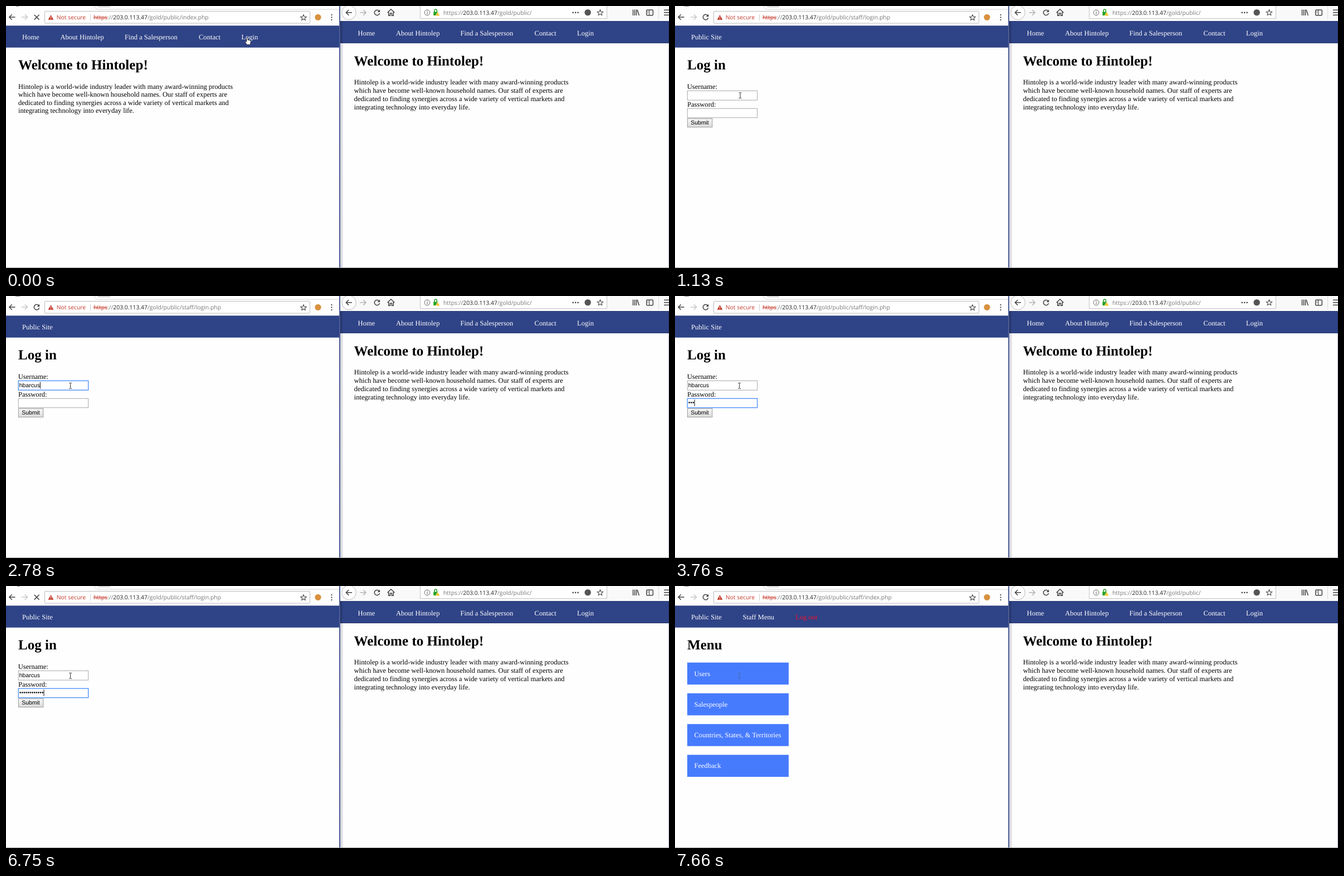
An HTML page that plays this animation: 1190 px wide and 471 px high, repeating every 8000 ms.

```html
<!DOCTYPE html>
<html lang="en">
<head>
<meta charset="utf-8">
<title>Login demo</title>
<style>
html, body { margin: 0; width: 100%; height: 100%; overflow: hidden; background: #fefefe; }
svg { display: block; width: 1190px; height: 471px; }
text { font: 12.55px "Liberation Serif", "Times New Roman", serif; text-rendering: geometricPrecision; white-space: pre; }
.h1 { font-size: 25.1px; font-weight: bold; }
.nav text, .menu text { fill: #fff; }
.menu rect { fill: #477bfe; }
.url { font: 10.37px "Open Sans", "Noto Sans", sans-serif; fill: #777; }
.host { fill: #222; }
.red { fill: #c5392a; }
.form { font: 10.43px "Liberation Sans", Arial, sans-serif; }
.hint { font: bold 8.9px "Open Sans", "Noto Sans", sans-serif; }
.field { fill: #fff; stroke: #a9a9a9; }
.field.on { stroke: #5a98fa; stroke-width: 1.5; }
.ico { fill: none; stroke: #444; stroke-width: 1.5; }
.off { stroke: #c8c8c8; }
</style>
</head>
<body>
<svg viewBox="0 0 1190 471">
  <defs>
    <linearGradient id="btn" x2="0" y2="1"><stop stop-color="#f8f8f8"/><stop offset="1" stop-color="#dadada"/></linearGradient>
    <linearGradient id="edge"><stop stop-color="#cfd0d8"/><stop offset="1" stop-color="#ebebee"/></linearGradient>
    <linearGradient id="shade"><stop stop-color="#000" stop-opacity=".25"/><stop offset="1" stop-opacity="0"/></linearGradient>
    <path id="back" d="M5.5 0H-5M-.3-4.8L-5.1 0L-.3 4.8"/>
    <path id="star" d="M0-5L1.5-1.6L5.2-1.3L2.4 1.1L3.2 4.7L0 2.8L-3.2 4.7L-2.4 1.1L-5.2-1.3L-1.5-1.6Z" stroke-width="1.1"/>
    <g id="reload"><path d="M3.6-3A4.7 4.7 0 1 0 4.6 1.2"/><path d="M5.2-5.4V-.8H.6Z" fill="#444" stroke="none"/></g>
    <g id="site">
      <g class="nav">
        <text x="29" y="60">Home</text>
        <text x="97.4" y="60">About Hintolep</text>
        <text x="213" y="60">Find a Salesperson</text>
        <text x="346" y="60">Contact</text>
        <text x="422.4" y="60">Login</text>
      </g>
      <text class="h1" x="22" y="114.3">Welcome to Hintolep!</text>
    </g>
  </defs>

  <rect width="1190" height="471" fill="#fefefe"/>

  <!-- left browser -->
  <path d="M158 0Q161 6 165 6H598" fill="none" stroke="#d4d4d4"/>
  <path d="M164 0Q165 2.5 168 2.5H185Q188 2.5 187 0Z" fill="#d9d9d9"/>
  <path id="tab" d="M17 .4H25" stroke="#777" stroke-width=".9"/>
  <g class="ico">
    <use href="#back" x="11" y="20"/>
    <use href="#back" class="off" transform="translate(33.5 20) scale(-1 1)"/>
    <use id="again" href="#reload" x="55" y="20"/>
    <path id="stop" d="M50.7 15.7L59.6 24.6M59.6 15.7L50.7 24.6"/>
    <rect x="69.5" y="9.5" width="476" height="21.5" rx="1.5" fill="#fff" stroke="#bcbcbc" stroke-width="1"/>
    <use href="#star" x="534" y="20.7"/>
    <path d="M151.5 14.5V26.5" stroke="#ccc" stroke-width="1"/>
  </g>
  <path d="M80.5 16L85.4 24.8H75.6Z" fill="#c5392a"/>
  <path d="M80.5 18.8V21.6M80.5 22.6V23.7" stroke="#fff"/>
  <text class="url red" x="90.8" y="24.3">Not secure</text>
  <text class="url" x="157" y="24.3"><tspan class="red">https</tspan>://<tspan class="host">203.0.113.47</tspan>/gold/public/<tspan id="path"></tspan></text>
  <path d="M157 21H182" stroke="#c5392a"/>
  <circle cx="560" cy="20.3" r="5.6" fill="#d9913f"/>
  <path d="M584.5 16V25.5" stroke="#444" stroke-width="2.3" stroke-linecap="round" stroke-dasharray="0 4.5"/>
  <rect y="35.3" width="598" height="39.4" fill="#2f4387"/>

  <g id="home">
    <use href="#site"/>
    <text x="22" y="149">Hintolep is a world-wide industry leader with many award-winning products</text>
    <text x="22" y="163.3">which have become well-known household names. Our staff of experts are</text>
    <text x="22" y="177.7">dedicated to finding synergies across a wide variety of vertical markets and</text>
    <text x="22" y="192">integrating technology into everyday life.</text>
  </g>

  <g id="login">
    <g class="nav"><text x="29" y="60">Public Site</text></g>
    <text class="h1" x="22" y="114.3">Log in</text>
    <text x="21.7" y="149">Username:</text>
    <rect id="userBox" class="field" x="22.3" y="152.4" width="125.4" height="16.8"/>
    <text id="user" class="form" x="23.8" y="164"></text>
    <text x="22" y="181">Password:</text>
    <rect id="passBox" class="field" x="22.3" y="184.3" width="125.4" height="16.4"/>
    <path id="dots" stroke="#111" stroke-width="2.8" stroke-linecap="round" stroke-dasharray="0 3.65"/>
    <rect x="22.4" y="202.4" width="44.4" height="15.4" fill="url(#btn)" stroke="#9c9c9c"/>
    <text class="form" x="28.2" y="213.4">Submit</text>
    <g id="hints">
      <rect id="hintBox" x="21.5" y="169.8" width="127.5" fill="#fff"/>
      <path id="hintEdge" stroke="#ddd" stroke-width=".8" fill="none"/>
      <text class="hint" x="28.3" y="182.2">hbarcus</text>
      <text id="hint2" class="hint" x="28.3" y="201">hbarrcus</text>
    </g>
    <path id="caret" stroke="#111"/>
  </g>

  <g id="menu">
    <g class="nav">
      <text x="29" y="60">Public Site</text>
      <text x="121.5" y="60">Staff Menu</text>
      <text x="216.3" y="60" style="fill:#f2122c">Log out</text>
    </g>
    <text class="h1" x="22" y="114.3">Menu</text>
    <g class="menu" id="items"></g>
  </g>

  <g id="hand" transform="translate(428.7 56)">
    <path d="M3.2 1.4Q4.4-.2 5.4 1.4V5L9.3 5.8Q10.8 6.3 10.6 8L9.5 13.5H4L.7 9Q.2 7.6 1.6 7.5L3.2 8.6Z" fill="#fff" stroke="#222" stroke-width=".8"/>
  </g>
  <path id="arrow" d="M0 0V10.6L2.5 8.4L4.1 12L5.7 11.3L4.2 7.8H7.6Z" fill="#fff" stroke="#111" stroke-width=".8"/>
  <path id="beam" d="M-2.5-5H-.6L0-4.4L.6-5H2.5M0-4.4V4.4M-2.5 5H-.6L0 4.4L.6 5H2.5" fill="none" stroke="#333"/>

  <!-- right browser -->
  <rect x="600" width="590" height="27.5" fill="#f9f9fa"/>
  <g class="ico">
    <circle cx="615.5" cy="11.8" r="12.8" fill="#fff" stroke="#bbb" stroke-width="1"/>
    <use href="#back" x="615.5" y="11.8"/>
    <use href="#back" style="stroke:#b4b4b4" transform="translate(641 11.8) scale(-1 1)"/>
    <use href="#reload" x="666" y="11.8"/>
    <path d="M684.6 12L691 5.8L697.4 12M686.7 10.8V17.2H689.5V13H692.5V17.2H695.3V10.8"/>
    <path d="M743.5-1V22.5H1078.5V-1" fill="#fff" stroke="#c4c4c4" stroke-width="1"/>
    <circle cx="756" cy="11.8" r="4.9" stroke="#666" stroke-width="1"/>
    <path d="M756 8.8V10M756 11V14.6" stroke="#666" stroke-width="1.2"/>
    <path d="M769 11V8.5Q769 6 771.2 6T773.4 8.5V11" stroke="#23a023"/>
    <use href="#star" x="1066.5" y="11.8"/>
    <path d="M1125.5 6.5V17M1128.5 6.5V17M1131.5 6.5V17M1133 6.8L1136.4 17"/>
    <rect x="1149.7" y="6.9" width="11.6" height="9.8" rx="1.5"/>
    <path d="M1154.6 7V16.5M1151.5 9.8H1153M1151.5 12H1153" stroke-width="1.1"/>
    <path d="M1171.5 0V24" stroke="#ddd" stroke-width="1"/>
    <path d="M1181 7.3H1190M1181 11.8H1190M1181 16.3H1190"/>
  </g>
  <rect x="767.3" y="10.5" width="7.8" height="6.5" rx=".8" fill="#23a023"/>
  <path d="M774.8 10.5L778.8 17.7H770.8Z" fill="#f7c52d" stroke="#fff" stroke-width=".5"/>
  <path d="M1017.8 11.8H1027" stroke="#444" stroke-width="2.7" stroke-linecap="round" stroke-dasharray="0 4.4"/>
  <circle cx="1044.2" cy="11.6" r="5.7" fill="#555"/>
  <text class="url" x="785" y="15.8">https://<tspan class="host">203.0.113.47</tspan>/gold/public/</text>
  <path d="M1189.5 67V471" stroke="#b9bdcf"/>
  <rect x="600.5" y="27.5" width="589" height="39" fill="#2f4387" stroke="#25376f"/>
  <rect x="600" y="27" width="5" height="40" fill="url(#shade)"/>
  <rect x="600" y="67" width="5" height="404" fill="url(#edge)"/>
  <use href="#site" x="602.6" y="-7.4"/>
  <text x="624.7" y="141.2">Hintolep is a world-wide industry leader with many award-winning products</text>
  <text x="624.7" y="156.3">which have become well-known household names. Our staff of experts are</text>
  <text x="624.7" y="171.3">dedicated to finding synergies across a wide variety of vertical markets and</text>
  <text x="624.7" y="186.4">integrating technology into everyday life.</text>
  <path d="M599 0V471" stroke="#2f4387" stroke-width="1.7"/>
  <path d="M0 470.5H1190" stroke="#a6a6a6"/>
</svg>
<script>
const LOOP = 8000, NAME = 'hbarcus';
const el = {};
document.querySelectorAll('svg [id]').forEach(n => el[n.id] = n);

el.items.innerHTML = ['Users', 'Salespeople', 'Countries, States, &amp; Territories', 'Feedback']
  .map((label, i) => `<g transform="translate(0 ${i * 55.3})"><rect x="22" y="137.6" width="182" height="39.6"/>
    <text x="34.5" y="161.6">${label}</text></g>`).join('');

// [start, letters typed]
const typing = [[0, 0], [2090, 1], [2360, 2], [2520, 4], [2660, 6], [2780, 7]];
const dotTimes = [3310, 3450, 3760, 4190, 4440, 5000, 5290, 5590, 5990, 6110, 6230, 6350];
// [start, shape, x, y]
const pointer = [[0, 'hand'], [120, 'arrow', 432, 56.4], [710, 'arrow', 413.4, 63], [860, 'arrow', 140.4, 135],
  [1010, 'arrow', 126, 147], [1130, 'beam', 117, 160.8], [1280, 'beam', 115.6, 161.3]];

const current = (list, t) => list.filter(s => s[0] <= t).pop();
const within = (t, a, b) => t >= a && t < b;
const show = (node, on) => { node.style.display = on ? '' : 'none'; };
const attr = (node, name, value) => node.setAttribute(name, value);

function drawForm(t) {
  const onUser = within(t, 1280, 2930), onPass = t >= 2930;
  el.userBox.classList.toggle('on', onUser);
  el.passBox.classList.toggle('on', onPass);
  el.user.textContent = NAME.slice(0, current(typing, t)[1]);

  const dots = dotTimes.filter(s => s <= t).length;
  attr(el.dots, 'd', dots ? `M25.6 191.6h${(dots - 1) * 3.65 + .1}` : '');

  const rows = t < 2660 ? 2 : 1, bottom = rows === 2 ? 209 : 190;
  show(el.hints, within(t, 2090, 2780));
  show(el.hint2, rows === 2);
  attr(el.hintBox, 'height', bottom - 169.8);
  attr(el.hintEdge, 'd', `M22 169.8V${bottom}M22 169.8H148`);

  const blinkOff = within(t, 1780, 2090) || within(t, 6870, 7390);
  show(el.caret, (onUser || onPass) && !blinkOff);
  attr(el.caret, 'd', onPass
    ? `M${24.2 + dots * 3.65} 186.3V198`
    : `M${24.3 + el.user.getComputedTextLength()} 154.6V166.6`);
}

function draw(t) {
  const page = t < 120 ? 'home' : t < 7660 ? 'login' : 'menu';
  for (const id of ['home', 'login', 'menu']) show(el[id], id === page);
  el.path.textContent = { home: 'index.php', login: 'staff/login.php', menu: 'staff/index.php' }[page];

  const loading = t < 120 || within(t, 6750, 7660);
  show(el.stop, loading);
  show(el.again, !loading);
  attr(el.tab, 'd', loading ? `M${18 + Math.floor(t / 120) % 3} .4h5` : 'M17 .4H25');

  if (page === 'login') drawForm(t);

  const [, shape, x, y] = current(pointer, t);
  for (const id of ['hand', 'arrow', 'beam']) show(el[id], id === shape);
  if (shape !== 'hand') attr(el[shape], 'transform', `translate(${x} ${y})`);
  attr(el.beam, 'stroke', page === 'menu' ? '#4a69b0' : '#333');
}

const start = performance.now();
function tick() {
  draw((performance.now() - start) % LOOP);
  requestAnimationFrame(tick);
}
tick();
</script>
</body>
</html>
```
